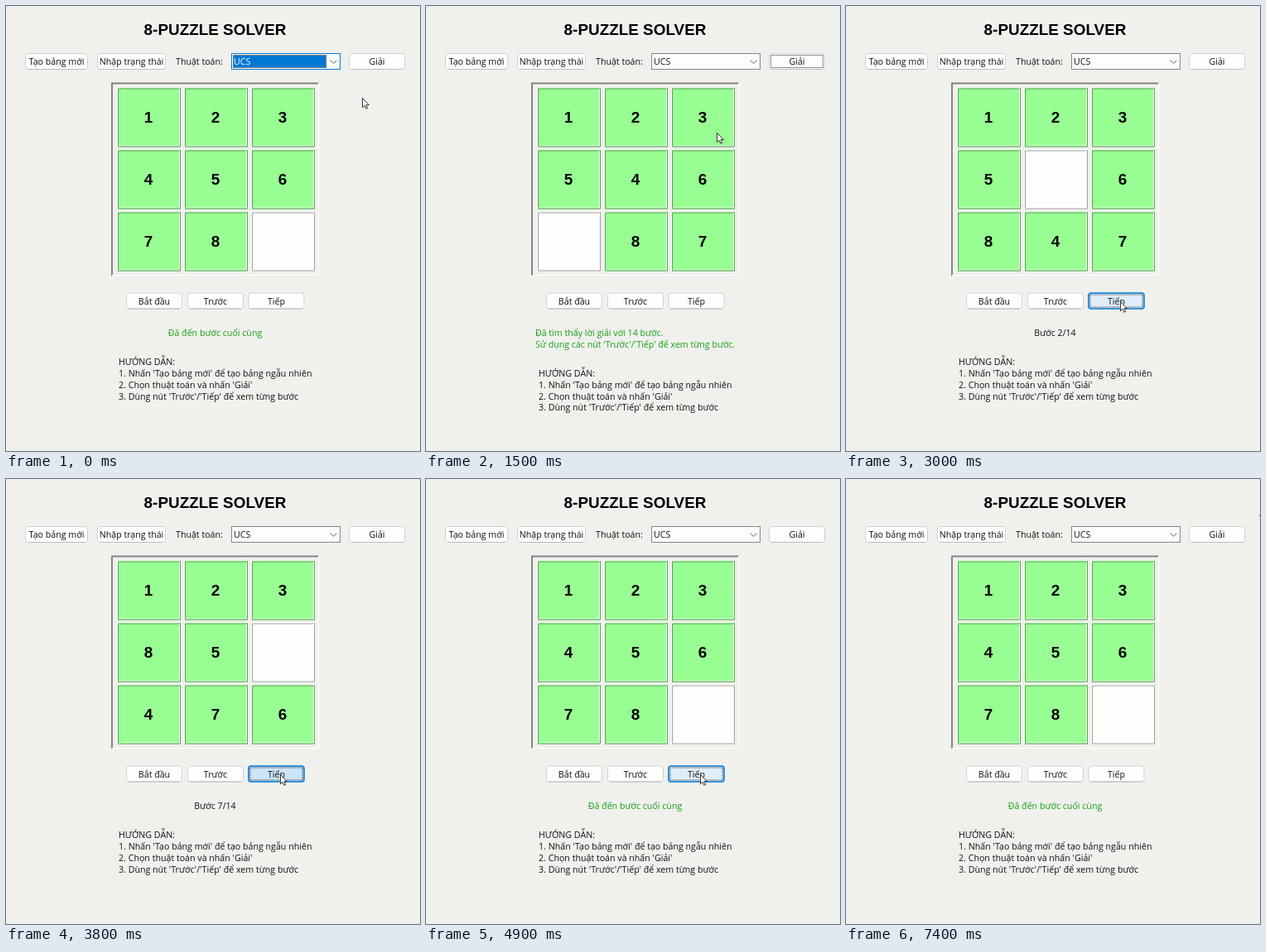
Animation, 500 px wide and 538 px high, one loop 7500 ms. Source, as an HTML page:

```html
<!DOCTYPE html>
<html lang="vi">
<head>
<meta charset="utf-8">
<title>8-Puzzle Solver</title>
<style>
html, body { margin: 0; width: 100%; height: 100%; overflow: hidden; background: #f0f0ed; }
svg { display: block; font: 10.65px "Open Sans", "Noto Sans", sans-serif; }
.bold { font: bold 18.9px "Liberation Sans", Arial, sans-serif; }
</style>
</head>
<body>
<svg id="stage" width="500" height="538" viewBox="0 0 500 538"></svg>
<script>
const LOOP = 7500, TICK = 100;
const PRESS_SOLVE = 500, SOLVED = 600;
const STEP_BASE = 2690, STEP_GAP = 140, HOLD = 70;  // click n is released at base + n * gap
const BLUE = '#0078d4', GREEN = '#15a015';
const SHIFT = { R: 1, L: -1, U: -3, D: 3 };

// Every board on the way to the goal; 0 is the blank
const boards = [[1, 2, 3, 5, 4, 6, 0, 8, 7]];
for (const move of 'RULDRRULLDRURD') {
  const next = [...boards.at(-1)], blank = next.indexOf(0), other = blank + SHIFT[move];
  [next[blank], next[other]] = [next[other], 0];
  boards.push(next);
}

// time, x, y of the pointer tip
const path = [
  [0, 430, 111], [400, 447, 66], [800, 447, 66], [1400, 351, 153], [1700, 351, 153],
  [2400, 331, 357], [5000, 331, 357], [5400, 452, 132], [5700, 482, 169]
];

function pointerAt(t) {
  const i = path.findIndex(p => p[0] > t);
  if (i < 0) return path.at(-1).slice(1);
  const [t0, x0, y0] = path[i - 1], [t1, x1, y1] = path[i];
  const u = (t - t0) / (t1 - t0), k = u * u * (3 - 2 * u);
  return [x0 + (x1 - x0) * k, y0 + (y1 - y0) * k];
}

const rect = (x, y, w, h, fill, more = '') =>
  `<rect x="${x}" y="${y}" width="${w}" height="${h}" fill="${fill}" ${more}/>`;
const line = (d, color, more = '') => `<path d="${d}" fill="none" stroke="${color}" ${more}/>`;
const text = (x, y, s, fill = '#111', more = '') => `<text x="${x}" y="${y}" fill="${fill}" ${more}>${s}</text>`;
const centred = (x, y, s, fill, more = '') => text(x, y, s, fill, 'text-anchor="middle" ' + more);

function button(x, y, w, label, { hover, pressed, focus } = {}) {
  const h = 20, fill = pressed ? '#cce4f7' : hover ? '#e0eef9' : '#fdfdfd';
  let s = rect(x + .5, y + .5, w - 1, h - 1, fill,
    `rx="3" stroke="${hover ? BLUE : '#d1d1d0'}" stroke-width="${hover ? 1.6 : 1}"`);
  if (!hover) s += line(`M${x + 3} ${y + h - .5}h${w - 6}`, '#bcbcbb');
  if (focus) s += rect(x + 2.5, y + 2.5, w - 5, h - 5, 'none', 'stroke="#222" stroke-dasharray="1 1"');
  return s + centred(x + w / 2, y + 14, label);
}

function combo(focus) {
  let s = rect(272.5, 57.5, 131, 19, '#fdfdfd', `stroke="${focus ? BLUE : '#858585'}"`);
  if (focus) {
    s += rect(274, 59, 113, 16, BLUE) +
      rect(274.5, 59.5, 112, 15, 'none', 'stroke="#e08a30" stroke-dasharray="1 1"') +
      line('M387.5 58v18', '#cfe3f3');
  }
  return s + text(275, 71, 'UCS', focus ? '#fff' : '#111') + line('M391.5 65.5l4 4 4-4', '#666');
}

function tile(n, i) {
  const x = 134 + i % 3 * 81, y = 98.5 + Math.floor(i / 3) * 75, w = 77, h = 72;
  const [face, dark] = n ? ['#98fd92', '#5d9c5a'] : ['#fefefd', '#a2a2a0'];
  return rect(x, y, w, h, face) +
    line(`M${x + .5} ${y + h}v${.5 - h}h${w}`, '#fafffa') +
    line(`M${x + 1.5} ${y + h - 1}v${2.5 - h}h${w - 2}`, dark) +
    line(`M${x + 2} ${y + h - 1.5}h${w - 3.5}v${3 - h}`, '#f4fff4') +
    line(`M${x + 1} ${y + h - .5}h${w - 1.5}v${1 - h}`, dark) +
    (n ? centred(x + 38, y + 42.3, n, '#000', 'class="bold"') : '');
}

function board(cells) {
  return line('M128 326V93.5H378', '#858585', 'stroke-width="2"') +
    line('M128 325.5H377.5V93', '#fff') + cells.map(tile).join('');
}

function status(t, clicks) {
  if (t < SOLVED || clicks > 14) return centred(252.5, 399, 'Đã đến bước cuối cùng', GREEN);
  if (clicks) return centred(252.5, 399, `Bước ${clicks}/14`);
  return text(132, 399, 'Đã tìm thấy lời giải với 14 bước.', GREEN) +
    text(132, 412.8, "Sử dụng các nút 'Trước'/'Tiếp' để xem từng bước.", GREEN);
}

const guide = top => [
  'HƯỚNG DẪN:',
  "1. Nhấn 'Tạo bảng mới' để tạo bảng ngẫu nhiên",
  "2. Chọn thuật toán và nhấn 'Giải'",
  "3. Dùng nút 'Trước'/'Tiếp' để xem từng bước"
].map((s, i) => text(136, top + i * 13.8, s)).join('');

const pointer = ([x, y]) =>
  `<path transform="translate(${x} ${y})" d="M.5 .5v11.2l2.6-2.4 1.8 4 1.8-.8-1.8-3.9h3.5z" fill="#fff" stroke="#222" stroke-width=".9"/>`;

function draw(t) {
  const clicks = Math.max(0, Math.min(15, Math.floor((t - STEP_BASE) / STEP_GAP)));
  const nextRelease = STEP_BASE + (clicks + 1) * STEP_GAP;
  const firstPress = STEP_BASE + STEP_GAP - HOLD;
  const visible = t < 5800, tip = pointerAt(t);
  const over = (x, y, w) => visible && tip[0] >= x && tip[0] < x + w && tip[1] >= y && tip[1] < y + 20;
  const cells = t < SOLVED ? boards[14] : boards[Math.min(14, clicks)];
  const showsFound = t >= SOLVED && !clicks;

  let s = centred(252.5, 35.2, '8-PUZZLE SOLVER', '#000', 'class="bold"') +
    button(23, 57, 76, 'Tạo bảng mới') +
    button(110, 57, 83, 'Nhập trạng thái') +
    text(205, 71, 'Thuật toán:') +
    combo(t < PRESS_SOLVE) +
    button(414, 57, 68, 'Giải', {
      hover: over(414, 57, 68),
      pressed: t >= PRESS_SOLVE && t < SOLVED,
      focus: t >= PRESS_SOLVE && t < firstPress
    }) +
    board(cells) +
    button(145, 346.5, 68, 'Bắt đầu') +
    button(219, 346.5, 68, 'Trước') +
    button(292.5, 346.5, 68, 'Tiếp', {
      hover: over(292.5, 346.5, 68),
      pressed: t >= firstPress && clicks < 15 && t >= nextRelease - HOLD,
      focus: t >= firstPress && t < 7400
    }) +
    status(t, clicks) + guide(showsFound ? 448 : 434.3);

  if (visible) s += pointer(tip);
  else if (t >= 6500) s += rect(499, 43.5, 1, 1.2, '#333');
  else if (t >= 6400) s += rect(498.5, 36, 1.5, 9, '#555');
  stage.innerHTML = s;
}

const stage = document.getElementById('stage');
let shown = -1;
function frame() {
  const t = Math.floor(performance.now() % LOOP / TICK) * TICK;
  if (t !== shown) draw(shown = t);
  requestAnimationFrame(frame);
}
frame();
</script>
</body>
</html>
```
